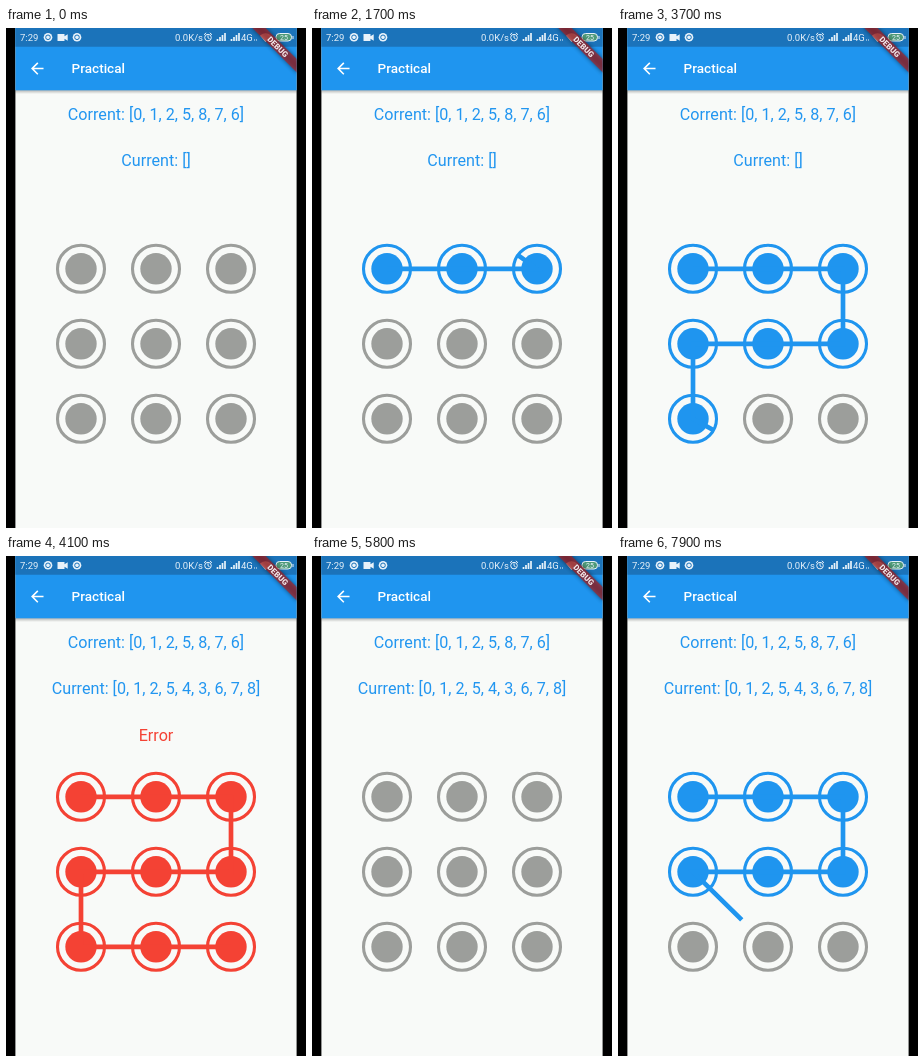
Write an HTML page that moves like this. It is 300 px wide and 500 px high and loops after 8000 ms.

```html
<!DOCTYPE html>
<html lang="en">
<head>
<meta charset="utf-8">
<title>Pattern lock</title>
<style>
  html, body { margin: 0; width: 100%; height: 100%; overflow: hidden; background: #000; }
  svg { display: block; width: 300px; height: 500px; font-family: Roboto, sans-serif; }
  .info { font-size: 16.15px; text-anchor: middle; fill: #2296f0; }
  .bar text { font-size: 9.5px; fill: #e8f2fa; }
</style>
</head>
<body>
<svg viewBox="0 0 300 500">
  <defs>
    <clipPath id="screen"><rect x="9.4" width="281.2" height="500"/></clipPath>
    <linearGradient id="shade" x2="0" y2="1">
      <stop stop-color="#000" stop-opacity=".28"/>
      <stop offset="1" stop-color="#000" stop-opacity="0"/>
    </linearGradient>
    <filter id="blur" x="-20%" y="-60%" width="140%" height="220%"><feGaussianBlur stdDeviation="2"/></filter>
    <path id="signal" d="M1 13v-2M3.500 13v-4M6 13v-6M8.500 13v-8" stroke="#e8f2fa" stroke-width="1.700"/>
    <g id="rec">
      <circle r="4.300" fill="#e8f2fa"/>
      <circle r="2.300" fill="none" stroke="#1b73ba"/>
    </g>
  </defs>
  <g clip-path="url(#screen)">
    <rect width="300" height="500" fill="#f8faf8"/>
    <rect y="62" width="300" height="4" fill="url(#shade)"/>
    <rect width="300" height="62.300" fill="#1f95ef"/>
    <rect width="300" height="18.750" fill="#1b73ba"/>

    <g class="bar">
      <text x="14" y="12.800">7:29</text>
      <use href="#rec" x="42" y="9.300"/>
      <path d="M51.500 6h7v2.200l3.200-2v6.600l-3.200-2V13h-7z" fill="#e8f2fa"/>
      <use href="#rec" x="71" y="9.300"/>
      <text x="169" y="12.800">0.0K/s</text>
      <g fill="none" stroke="#e8f2fa">
        <circle cx="202" cy="9.600" r="3.300"/>
        <path d="M202 7.400v2.400l1.600 1M198 6.800l2.200-2M206 6.800l-2.200-2"/>
      </g>
      <use href="#signal" x="210.500"/>
      <use href="#signal" x="224.500"/>
      <text x="235" y="12.800">4G</text>
      <path d="M248 12h1m1 0h1" stroke="#e8f2fa"/>
      <path d="M254 7.500Q259.500 3 265 7.500L259.500 14Z" fill="#e8f2fa"/>
      <rect x="270" y="5.500" width="15.500" height="7.500" rx="3.500" fill="#4f9a78" stroke="#e8f2fa"/>
      <path d="M287 8v3" stroke="#e8f2fa"/>
      <text x="278" y="11.800" text-anchor="middle" style="font-size:7px">25</text>
    </g>

    <path transform="translate(21.900 31.200) scale(.781)" fill="#fff"
      d="M20 11H7.830l5.590-5.590L12 4l-8 8 8 8 1.410-1.410L7.830 13H20z"/>
    <text x="65.600" y="45.100" font-size="13.500" font-weight="500" fill="#fff">Practical</text>

    <text class="info" x="150" y="91.500">Corrent: [0, 1, 2, 5, 8, 7, 6]</text>
    <text class="info" x="150" y="138.300" id="current"></text>
    <text class="info" x="150" y="185.300" id="error" style="fill:#f44234">Error</text>

    <g id="dots"></g>
    <polyline id="line" fill="none" stroke-width="4.700"/>

    <g transform="translate(290.600 0) rotate(45)">
      <rect x="-32" y="21.900" width="64" height="9.400" opacity=".5" filter="url(#blur)"/>
      <rect x="-32" y="21.900" width="64" height="9.400" fill="#b71c1c" fill-opacity=".63"/>
      <text y="29.500" font-size="8" font-weight="900" text-anchor="middle" fill="#f3e6e8">DEBUG</text>
    </g>
  </g>
</svg>
<script>
const LOOP = 8000, STEP = 100, HIT = 24.5;
const RELEASE = 4100, RESET = 5700;
const GREY = '#9c9e9b', BLUE = '#1f95ef', RED = '#f44234';

const $ = id => document.getElementById(id);
const place = ([col, row]) => [75 + 75 * col, 240.8 + 75 * row];
const centers = [...Array(9).keys()].map(i => place([i % 3, Math.floor(i / 3)]));

// The finger's turning points in grid units, and when each stroke reaches them
const route = [[0, 0], [1.75, -.18], [2, 0], [2, 1], [0, 1], [.65, 1.64], [.27, 2.15], [2, 2]].map(place);
const first = [1200, 1700, 2200, 2700, 3200, 3500, 3700, RELEASE];
const second = [5900, 6300, 6500, 7000, 7600, 7900];

const dots = centers.map(([x, y]) => {
  const g = document.createElementNS('http://www.w3.org/2000/svg', 'g');
  g.innerHTML = `<circle cx="${x}" cy="${y}" r="23.5" fill="none" stroke-width="3.1"/>
    <circle cx="${x}" cy="${y}" r="15.7" stroke="none"/>`;
  $('dots').append(g);
  return g;
});

function fingerAt(times, t) {
  const i = times.findIndex(s => s > t);
  if (i < 0) return route[times.length - 1];
  const k = (t - times[i - 1]) / (times[i] - times[i - 1]);
  const ease = k * k * (3 - 2 * k);
  return route[i].map((to, axis) => {
    const from = route[i - 1][axis];
    return from + (to - from) * ease;
  });
}

// Dots touched by a stroke up to time t, in order
function touched(times, t) {
  const path = [];
  for (let s = times[0]; s <= t; s += STEP) {
    const [x, y] = fingerAt(times, s);
    const hit = centers.findIndex(([cx, cy]) => Math.hypot(x - cx, y - cy) < HIT);
    if (hit >= 0 && !path.includes(hit)) path.push(hit);
  }
  return path;
}

const result = touched(first, RELEASE).join(', ');

function draw(t) {
  const times = t < RESET ? first : second;
  const failed = t >= RELEASE && t < RESET;
  const path = touched(times, t);
  const color = failed ? RED : BLUE;
  const points = path.map(i => centers[i]);
  if (path.length && !failed) points.push(fingerAt(times, t));

  dots.forEach((dot, i) => {
    const c = path.includes(i) ? color : GREY;
    dot.setAttribute('fill', c);
    dot.setAttribute('stroke', c);
  });
  $('line').setAttribute('points', points.join(' '));
  $('line').setAttribute('stroke', color);
  $('current').textContent = `Current: [${t >= RELEASE ? result : ''}]`;
  $('error').style.display = failed ? '' : 'none';
}

const start = performance.now();
function tick() {
  const t = (performance.now() - start) % LOOP;
  draw(Math.floor(t / STEP) * STEP);
  requestAnimationFrame(tick);
}
tick();
</script>
</body>
</html>
```
